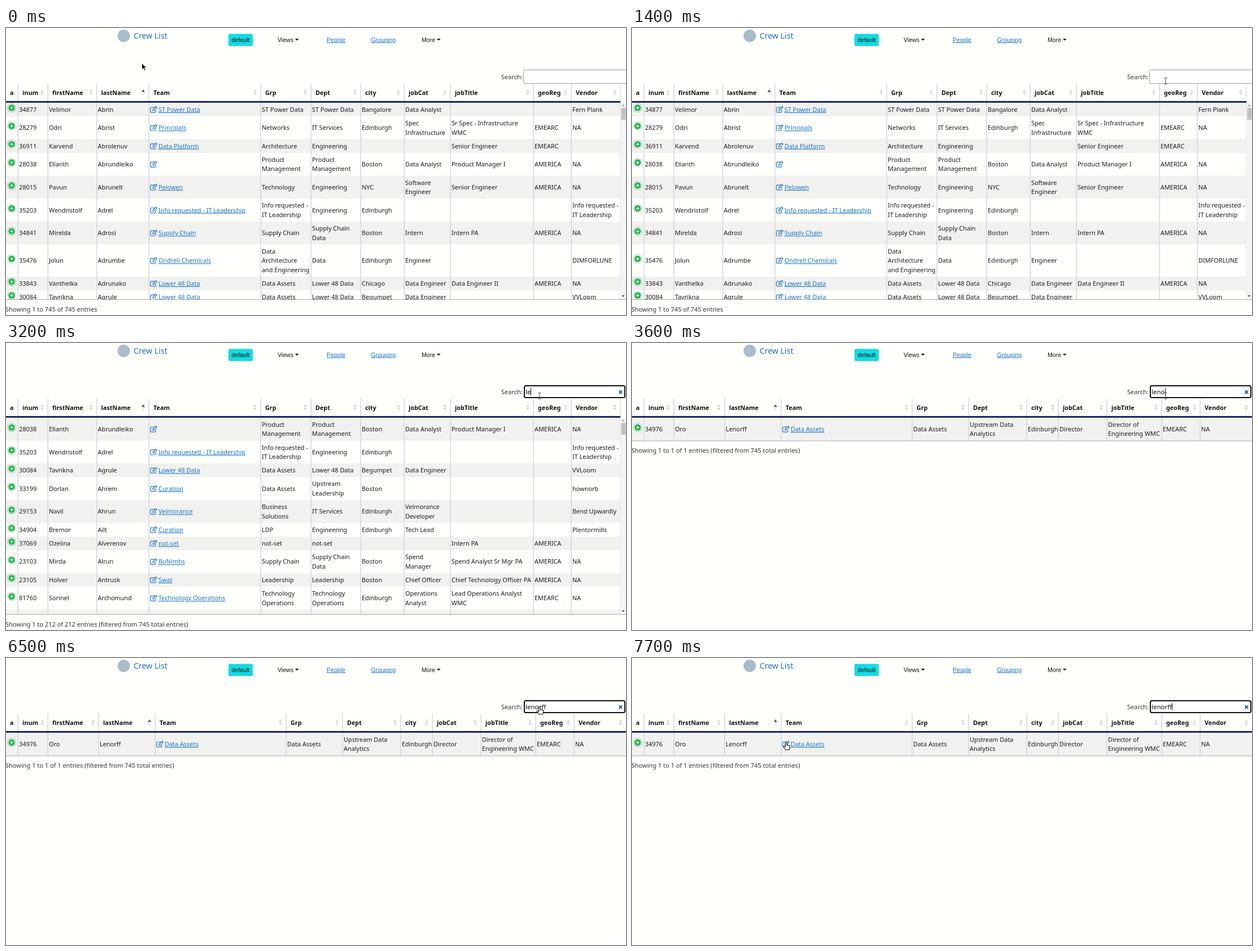
An HTML page that plays this animation: 1098 px wide and 510 px high, repeating every 8 s.

```html
<!DOCTYPE html>
<html lang="en">
<head>
<meta charset="utf-8">
<title>Staff table search</title>
<style>
  html, body { margin: 0; width: 100%; height: 100%; overflow: hidden; background: #fffffc; }
  svg { display: block; width: 1098px; height: 510px; }
  text { font: 10.9px "Noto Sans", "Open Sans", sans-serif; fill: #1a1d20; white-space: pre; }
  .head { font-size: 10.8px; font-weight: 700; fill: #111; }
  .brand { font-size: 14.1px; fill: #1c70d6; }
  .nav { font: 10.6px "Liberation Sans", Arial, sans-serif; fill: #111; }
  .link { fill: #1a75d1; text-decoration: underline; }
  .note { font-size: 11px; fill: #333; }
  .typed { font-size: 11.5px; fill: #111; }
  .edit { fill: none; stroke: #1a75d1; stroke-width: 1.2; stroke-linejoin: round; }
  .hidden { display: none; }
</style>
</head>
<body>
<svg id="stage" viewBox="0 0 1098 510">
  <defs>
    <path id="edit" class="edit" d="M8.500 2.200H2Q.8 2.200 .8 3.400v6.400q0 1.200 1.200 1.200h6.800q1.200 0 1.200-1.200V7.300M5 7.800l.5-2.400L10.600.7l1.800 1.800-5 5z"/>
    <g id="plus">
      <circle r="8.200" fill="#444" opacity=".15"/>
      <circle r="7.600" fill="#444" opacity=".35"/>
      <circle r="7.100" fill="#fff"/>
      <circle r="5.800" fill="#17bb45"/>
      <path d="M-3 0H3M0-3V3" stroke="#fff" stroke-width="1.200"/>
    </g>
    <path id="up" d="M-3-.8L0-5.500 3-.8z"/>
    <path id="down" d="M-3 .8L0 5.500 3 .8z"/>
    <clipPath id="body"><rect y="132" width="1098" height="350.500"/></clipPath>
  </defs>

  <circle cx="208.500" cy="14" r="11" fill="#a9bccb"/>
  <text class="brand" x="226" y="19">Crew List</text>
  <rect x="394" y="10.500" width="43" height="21.500" rx="2.500" fill="#12dbe3"/>
  <text class="nav" x="415.500" y="24.500" text-anchor="middle">default</text>
  <text class="nav" x="481" y="24.500">Views</text>
  <path d="M512 19h6.500l-3.250 3.500zM763 19h6.500l-3.250 3.500z" fill="#111"/>
  <text class="nav link" x="568" y="24.500">People</text>
  <text class="nav link" x="646.500" y="24.500">Grouping</text>
  <text class="nav" x="736" y="24.500">More</text>

  <text class="note" x="877" y="90.500">Search:</text>
  <rect id="idle" x="916.500" y="74.500" width="190" height="24" rx="2" fill="#fff" stroke="#999"/>
  <rect id="focus" x="918" y="76" width="178" height="21" rx="2.500" fill="#fff" stroke="#101010" stroke-width="2"/>
  <text id="typed" class="typed" x="920" y="90.500"></text>
  <rect id="caret" y="80" width="1" height="13" fill="#111"/>
  <path id="clear" d="M1085.500 84.500l5.500 5.500m0-5.500l-5.500 5.500" stroke="#1a5ca6" stroke-width="2"/>

  <g id="tables"></g>

  <g id="arrow"><path d="M0 0V11.500L2.700 9l2 4.400 1.900-.9-2-4.200H8.300z" fill="#111" stroke="#fff" stroke-width=".8"/></g>
  <g id="beam"><path d="M-2.500-5.500h1.700l.8.700.8-.7h1.700M0-5V5M-2.500 5.500h1.700l.8-.7.8.7h1.700" fill="none" stroke="#444"/></g>
  <g id="hand"><path d="M-1.300 8V.8Q-1.300-.5 0-.5t1.300 1.300v4l4.300.8q1.200.3 1.100 1.600l-.9 5.800H-.9l-3.700-4.700q-.6-1.300.6-1.500t1.500.8z" fill="#fff" stroke="#111" stroke-width="1.100"/></g>
</svg>
<script>
const $ = id => document.getElementById(id);
const HEADS = 'a inum firstName lastName Team Grp Dept city jobCat jobTitle geoReg Vendor'.split(' ');
const WIDE = [-1, 21, 74, 160.5, 253, 451, 540, 628, 705, 787, 934, 1001, 1088];
const SLIM = [-1, 21, 74, 164, 264, 496, 596, 699, 755, 841, 938, 1006, 1098];
const TOP = 132.7, LINE = 16.5, PAD = 7.7;

// cells split by "|", lines inside a cell by "/"
const ALL = `34877|Velimor|Abrin|ST Power Data|ST Power Data|ST Power Data|Bangalore|Data Analyst|||Fern Plank
28279|Odri|Abrist|Principals|Networks|IT Services|Edinburgh|Spec/Infrastructure|Sr Spec - Infrastructure/WMC|EMEARC|NA
36911|Karvend|Abrolenuv|Data Platform|Architecture|Engineering|||Senior Engineer|EMEARC|
28038|Ellanth|Abrundleiko||Product/Management|Product/Management|Boston|Data Analyst|Product Manager I|AMERICA|NA
28015|Pavun|Abrunelt|Pelowen|Technology|Engineering|NYC|Software/Engineer|Senior Engineer|AMERICA|NA
35203|Wendristolf|Adrel|Info requested - IT Leadership|Info requested -/IT Leadership|Engineering|Edinburgh||||Info requested -/IT Leadership
34841|Mirelda|Adrosi|Supply Chain|Supply Chain|Supply Chain/Data|Boston|Intern|Intern PA|AMERICA|NA
35476|Jolun|Adrumbe|Ondrell Chemicals|Data/Architecture/and Engineering|Data|Edinburgh|Engineer|||DIMFORLUNE
33843|Vanthelka|Adrunako|Lower 48 Data|Data Assets|Lower 48 Data|Chicago|Data Engineer|Data Engineer II|AMERICA|NA
30084|Tavrikna|Agrule|Lower 48 Data|Data Assets|Lower 48 Data|Begumpet|Data Engineer|||VVLoom`;

const SOME = `28038|Ellanth|Abrundleiko||Product/Management|Product/Management|Boston|Data Analyst|Product Manager I|AMERICA|NA
35203|Wendristolf|Adrel|Info requested - IT Leadership|Info requested -/IT Leadership|Engineering|Edinburgh||||Info requested -/IT Leadership
30084|Tavrikna|Agrule|Lower 48 Data|Data Assets|Lower 48 Data|Begumpet|Data Engineer|||VVLoom
33199|Dorlan|Ahrem|Curation|Data Assets|Upstream/Leadership|Boston||||hownorb
29153|Navil|Ahrun|Velmorance|Business/Solutions|IT Services|Edinburgh|Velmorance/Developer|||Bend Upwardly
34904|Bremor|Ailt|Curation|LDP|Engineering|Edinburgh|Tech Lead|||Plentormills
37069|Ozelina|Alverenov|not-set|not-set|not-set|||Intern PA|AMERICA|
23103|Mirda|Alrun|BoNimbs|Supply Chain|Supply Chain/Data|Boston|Spend/Manager|Spend Analyst Sr Mgr PA|AMERICA|NA
23105|Holver|Antrusk|Swat|Leadership|Leadership|Boston|Chief Officer|Chief Technology Officer PA|AMERICA|NA
81760|Sorinel|Archomund|Technology Operations|Technology/Operations|Technology/Operations|Edinburgh|Operations/Analyst|Lead Operations Analyst/WMC|EMEARC|NA
|||||||Software/Engineer|||`;

const ONE = `34976|Oro|Lenorff|Data Assets|Data Assets|Upstream Data/Analytics|Edinburgh|Director|Director of/Engineering WMC|EMEARC|NA`;

const text = (x, y, s, cls = '') => `<text class="${cls}" x="${x}" y="${y}">${s}</text>`;
const rect = (x, y, w, h, fill) => `<rect x="${x}" y="${y}" width="${w}" height="${h}" fill="${fill}"/>`;
const use = (id, x, y, fill = 'none') => `<use href="#${id}" x="${x}" y="${y}" fill="${fill}"/>`;

function cell(x, mid, lines) {
  return lines.map((s, i) => text(x, mid + 4 + (i - (lines.length - 1) / 2) * LINE, s)).join('');
}

function row(cols, line, index, top) {
  const cells = line.split('|').map(c => c.split('/'));
  const h = PAD + LINE * Math.max(...cells.map(c => c.length));
  const mid = top + h / 2;
  let out = index % 2 ? '' : rect(0, top, cols[12], h, '#f1f1ef');
  out += use('plus', 10, mid - 3);
  cells.forEach((lines, i) => {
    const x = cols[i + 1] + 2;
    out += i === 3
      ? use('edit', x, mid - 6) + text(x + 15, mid + 4, lines[0], 'link')
      : cell(x, mid, lines);
  });
  return { out, h };
}

function scrollbar() {
  return rect(1088, 133, 10, 349, '#f4f4f4') + rect(1089.5, 142, 8, 21, '#c1c1c1') +
    '<path d="M1090.500 139h5l-2.500-3z" fill="#999"/><path d="M1090.500 475h5l-2.500 3z" fill="#444"/>';
}

function table(id, cols, data, note) {
  let y = TOP, rows = '', head = '', lines = '';
  data.split('\n').forEach((line, i) => {
    const r = row(cols, line, i, y);
    rows += r.out;
    y += r.h;
  });
  const end = Math.min(y, 482);
  HEADS.forEach((name, i) => {
    head += text(cols[i] + 8, 118.5, name, 'head');
    if (!i) return;
    const x = cols[i + 1] - 10;
    head += use('up', x, 114.5, i === 3 ? '#555' : '#d9d9db') + use('down', x, 114.5, i === 3 ? '#ececec' : '#d9d9db');
    lines += rect(cols[i] - .5, 99, 1.5, end - 99, '#d4d7df');
  });
  if (cols === WIDE) lines += rect(1087.5, 99, 1, 383, '#d4d7df') + scrollbar();
  return `<g id="${id}"><g clip-path="url(#body)">${rows}</g>${lines}${head}` +
    rect(0, 129.8, cols[12], 2.9, '#0a1a56') + rect(0, end, 1098, 1, '#aaa') +
    text(-1, end + 21.5, note, 'note') + '</g>';
}

$('tables').innerHTML =
  table('all', WIDE, ALL, 'Showing 1 to 745 of 745 entries') +
  table('some', WIDE, SOME, 'Showing 1 to 212 of 212 entries (filtered from 745 total entries)') +
  table('one', SLIM, ONE, 'Showing 1 to 1 of 1 entries (filtered from 745 total entries)');

const TYPING = [[0, ''], [3200, 'le'], [3600, 'leno'], [4800, 'lenor'], [5100, 'lenorf'], [5300, 'lenorff']];
const CARET = [[1600, 2100], [3200, 4200], [4800, 5900], [6600, 7100], [7700, 8000]];
const POINTER = [
  [0, 'arrow', 240.5, 62.5], [1400, 'beam', 945, 94], [4400, 'none', 0, 0],
  [6500, 'hand', 945, 87], [6600, 'hand', 890, 92], [6700, 'hand', 775, 101],
  [6800, 'hand', 640, 108], [6900, 'hand', 548, 110], [7100, 'hand', 470, 113],
  [7200, 'arrow', 345, 133], [7300, 'arrow', 254, 146], [7400, 'arrow', 262, 147],
  [7600, 'hand', 271, 150], [7700, 'hand', 273, 150]
];
const at = (list, t) => list.findLast(k => k[0] <= t);
const show = (id, on) => $(id).classList.toggle('hidden', !on);

// first move: an eased arc that sags over the header row, held for 100 ms a step
function pointer(t) {
  if (t < 600 || t >= 1400) return at(POINTER, t).slice(1);
  const k = Math.floor((t - 500) / 100) / 9, p = k * k * (3 - 2 * k);
  const y = 62.5 + 31.5 * p + 100 * p * (1 - p);
  return [y > 99 ? 'hand' : 'arrow', 240.5 + 704.5 * p, y];
}

function draw(now) {
  const t = now % 8000;
  const word = at(TYPING, t)[1];
  show('all', t < 3200);
  show('some', t >= 3200 && t < 3600);
  show('one', t >= 3600);
  show('idle', t < 1600);
  show('focus', t >= 1600);
  show('clear', word);

  if ($('typed').textContent !== word) $('typed').textContent = word;
  show('caret', CARET.some(([a, b]) => t >= a && t < b));
  $('caret').setAttribute('x', 920 + (word ? Math.round($('typed').getComputedTextLength()) : 0));

  const [kind, x, y] = pointer(t);
  for (const id of ['arrow', 'beam', 'hand']) show(id, id === kind);
  if (kind !== 'none') $(kind).setAttribute('transform', `translate(${x} ${y})`);
  requestAnimationFrame(draw);
}
requestAnimationFrame(draw);
</script>
</body>
</html>
```
